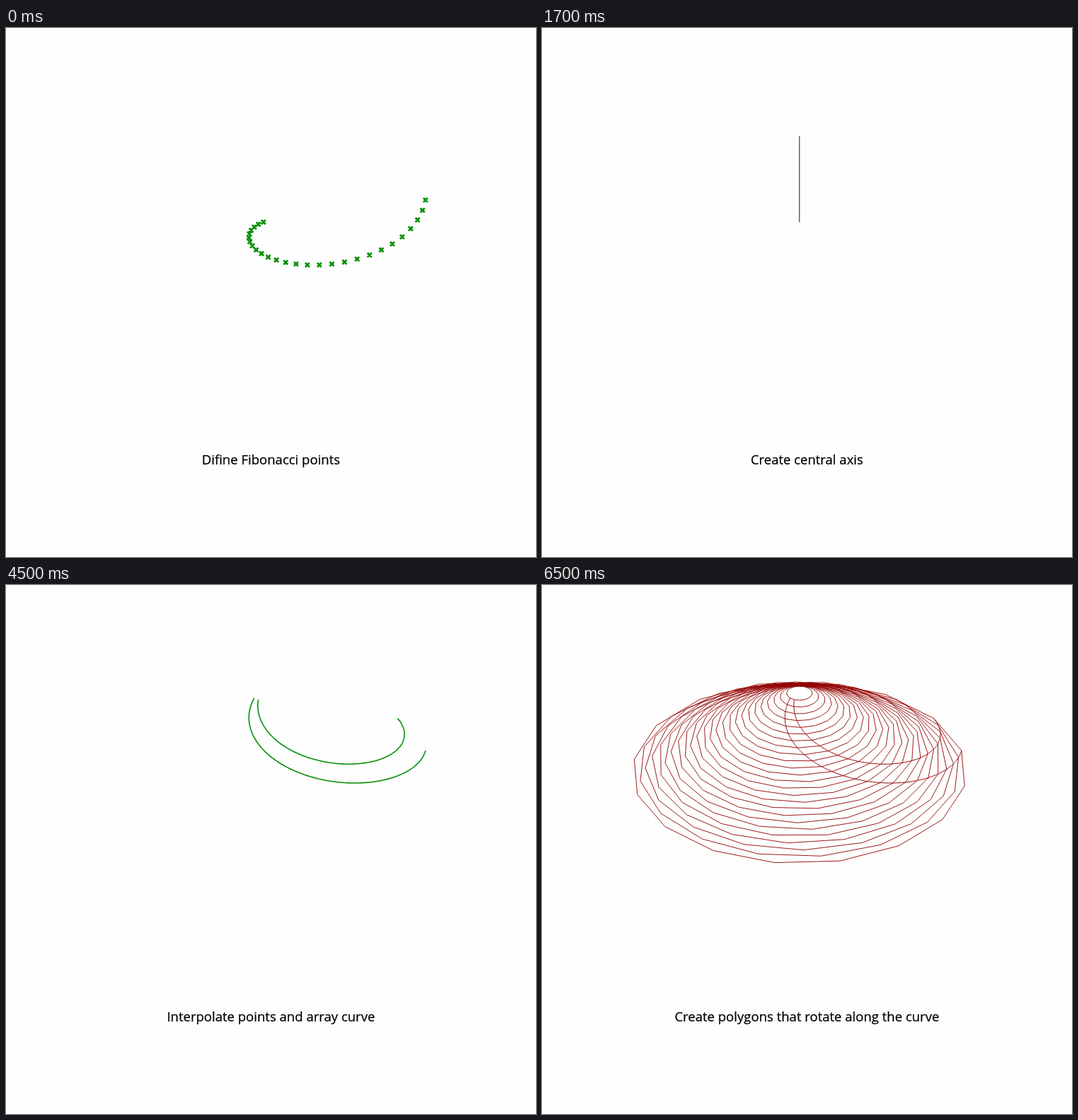
These frames come from a looping animation (749x748 px, 8 s). An HTML page:

```html
<!DOCTYPE html>
<html lang="en">
<head>
<meta charset="utf-8">
<title>Dome construction steps</title>
<style>
  html, body { margin: 0; width: 100%; height: 100%; overflow: hidden; background: #fefefe; }
  svg { display: block; width: 100%; height: 100%; }
  path { fill: none; }
  text {
    font: 18.55px "Open Sans", "Noto Sans", sans-serif;
    text-anchor: middle; fill: #000; stroke: #000; stroke-width: 0.25px;
  }
</style>
</head>
<body>
<svg id="stage" viewBox="0 0 749 748"></svg>
<script>
const LOOP = 8000;
const GREEN = '#069006', RED = '#920000', THIN_RED = '#8c1c1c';
const CX = 363.8, BASE = 274.5, TILT = 0.546;
const FIRST = 2, LAST = 26, SIDES = 16;
const RADIUS = 236, STEP = 6.23, END_ANGLE = -14;
const RISE = 121.5 / 26;
const SECTOR = 360 / SIDES;

const svg = document.getElementById('stage');

// Point i of the flat spiral, optionally turned by some degrees and lifted
function spiral(i, turn = 0, lift = 0) {
  const r = RADIUS * i / LAST;
  const a = (END_ANGLE + STEP * (LAST - i) + turn) * Math.PI / 180;
  return [CX + r * Math.cos(a), BASE - lift + r * Math.sin(a) * TILT];
}
const dome = (i, turn) => spiral(i, turn, (LAST + FIRST - i) * RISE);

const range = (from, to, step = 1) =>
  Array.from({ length: Math.round((to - from) / step) + 1 }, (_, k) => from + k * step);
const trace = pts => 'M' + pts.map(p => p.map(v => v.toFixed(2)).join(' ')).join('L');
const curve = turn => trace(range(FIRST, LAST, 0.125).map(i => dome(i, turn)));
const ring = i => trace(range(0, SIDES - 1).map(k => dome(i, k * SECTOR))) + 'Z';
const cross = ([x, y], d) =>
  `M${x - d} ${y - d}l${2 * d} ${2 * d}M${x - d} ${y + d}l${2 * d} ${-2 * d}`;

const path = (d, stroke, width) => `<path d="${d}" stroke="${stroke}" stroke-width="${width}"/>`;
const crosses = (pts, color, d, width) => path(pts.map(p => cross(p, d)).join(''), color, width);

const axis = path(`M${CX} 152.8V274.8`, THIN_RED, 1.2);
const curves = curve(0) + curve(-SECTOR);
const rings = range(FIRST, LAST).map(ring).join('');

const steps = [
  { at: 0, label: 'Difine Fibonacci points',
    art: crosses(range(0, LAST).map(i => spiral(i)), GREEN, 3, 2.8) },
  { at: 500, label: 'Create central axis', art: axis },
  { at: 2500, label: 'Fibonacci points moved as per dome rise',
    art: axis + path(curve(0), THIN_RED, 1) +
      crosses(range(FIRST, LAST).map(i => dome(i, 0)), RED, 3.2, 3.3) },
  { at: 4500, label: 'Interpolate points and array curve', art: path(curves, GREEN, 1.6) },
  { at: 6500, label: 'Create polygons that rotate along the curve',
    art: path(rings, RED, 0.9) + path(curves, RED, 1) }
];

svg.innerHTML = steps.map(s =>
  `<g display="none">${s.art}<text x="374.4" y="616.5">${s.label}</text></g>`).join('');
const groups = [...svg.children];

function render(t) {
  const current = steps.filter(s => s.at <= t).length - 1;
  groups.forEach((g, k) => g.setAttribute('display', k === current ? 'inline' : 'none'));
}

const start = performance.now();
function tick() {
  render((performance.now() - start) % LOOP);
  requestAnimationFrame(tick);
}
tick();
</script>
</body>
</html>
```
